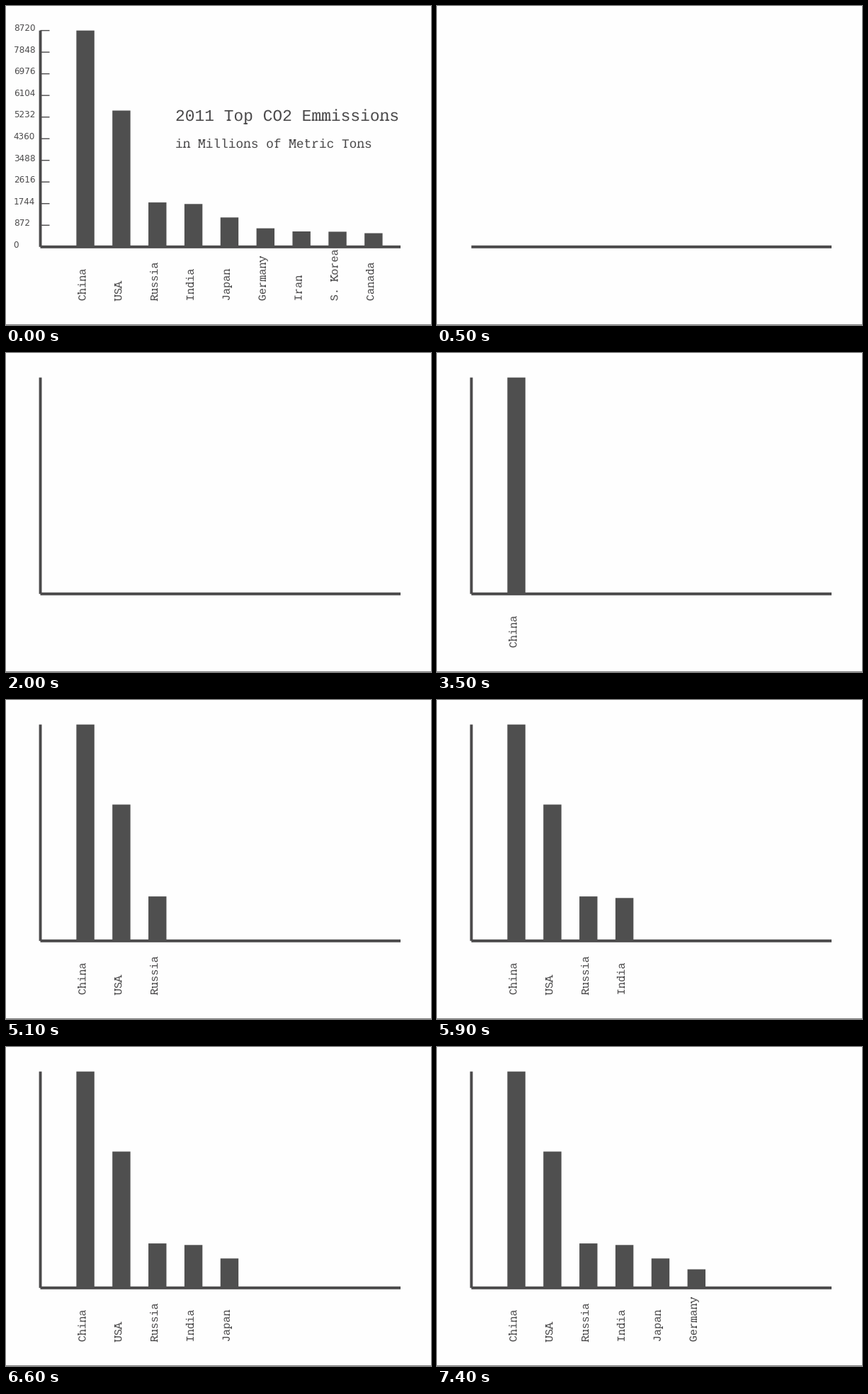
Write a matplotlib script that moves like this. It is 600 px wide and 450 px high and loops after 8000 ms.

```python
import numpy as np
import matplotlib.pyplot as plt
from matplotlib.animation import FuncAnimation
from matplotlib.patches import PathPatch, Rectangle
from matplotlib.path import Path
from matplotlib.textpath import TextPath
from matplotlib.transforms import Affine2D

W, H, DPI = 600, 450, 100
STEP, LOOP = 100, 8000
BG, INK, BAR = "#fefefe", "#4b4a4b", "#4f4f4f"
LEFT, RIGHT, TOP, BASE = 48.5, 557, 34.6, 339.8
PITCH = (RIGHT - LEFT) / 10

BARS = [  # name, bar top, time of appearance in ms (None: only in the full chart)
    ("China", 34.6, 3500), ("USA", 147.5, 4300), ("Russia", 277.1, 5100),
    ("India", 279.3, 5900), ("Japan", 298.3, 6600), ("Germany", 313.6, 7400),
    ("Iran", 318, None), ("S. Korea", 318.4, None), ("Canada", 320.5, None),
]

fig = plt.figure(figsize=(W / DPI, H / DPI), dpi=DPI, facecolor=BG)
ax = fig.add_axes([0, 0, 1, 1])
ax.set(xlim=(0, W), ylim=(H, 0))
ax.axis("off")


def box(x0, y0, x1, y1, color=INK):
    return ax.add_patch(Rectangle((x0, y0), x1 - x0, y1 - y0, lw=0,
                                  fc=color, snap=False))


def slab_glyph(ch):
    """Monospaced glyph, one em tall, with slab serifs on its plain stems."""
    glyph = TextPath((0, 0), ch, size=100, prop={"family": "Liberation Mono"})
    v, codes = glyph.vertices / 100, glyph.codes
    parts = [Path(v, codes)]
    if not ch.isalpha() or ch in "ilI":
        return parts
    ink = v[codes != Path.CLOSEPOLY]
    low, high = ink[:, 1].min(), ink[:, 1].max()
    reach = 0.045 if ch in "mM" else 0.08
    for a, b, code in zip(v[:-1], v[1:], codes[1:]):
        x0, x1 = sorted((a[0], b[0]))
        y = a[1]
        if code != Path.LINETO or abs(y - b[1]) > 0.003 or not 0.05 < x1 - x0 < 0.16:
            continue
        foot = abs(y) < 0.005 or abs(y - low) < 0.005
        if not foot and abs(y - high) > 0.005:
            continue
        x0 -= reach
        if foot or ch.isupper():
            x1 += reach
        y0, y1 = (y, y + 0.07) if foot else (y - 0.07, y)
        parts.append(Path([(x0, y0), (x0, y1), (x1, y1), (x1, y0), (x0, y0)],
                          closed=True))
    return parts


def typed(text, x, y, size, angle=0):
    parts = []
    for i, ch in enumerate(text):
        if ch != " ":
            shift = Affine2D().translate(0.6 * i, 0)
            parts += [p.transformed(shift) for p in slab_glyph(ch)]
    place = Affine2D().scale(size, -size).rotate_deg(angle).translate(x, y)
    word = Path.make_compound_path(*parts).transformed(place)
    return ax.add_patch(PathPatch(word, fc=INK, lw=0, snap=False))


# Always on: horizontal axis and the hairline at the bottom edge
box(LEFT, BASE - 2, RIGHT, BASE + 2)
box(0, 449, W, 450, "#7c7c7c")

timed = [(2000, [box(46.6, TOP, 50.5, BASE)])]

for i, (name, top, start) in enumerate(BARS):
    x = LEFT + PITCH * (i + 1)
    timed.append((start, [box(x, top, x + PITCH / 2, BASE, BAR),
                          typed(name, x + 13, 416.2, 15.2, -90)]))

scale = []
for k, y in enumerate(np.linspace(BASE, TOP, 11)):
    scale.append(ax.text(10.7, y + 0.8, str(872 * k), color=INK,
                         family="DejaVu Sans", size=12 * 72 / DPI, va="baseline"))
    if k:
        scale.append(box(LEFT, y - 0.7, 61.5, y + 0.7))
timed.append((None, scale))
timed.append((None, [typed("2011 Top CO2 Emmissions", 239, 162, 22.9),
                     typed("in Millions of Metric Tons", 239, 200, 17.8)]))


def update(n):
    t = n * STEP
    for start, parts in timed:
        on = t < 500 or (start is not None and t >= start)
        for part in parts:
            part.set_visible(on)
    return []


anim = FuncAnimation(fig, update, frames=LOOP // STEP, interval=STEP,
                     repeat=True, repeat_delay=0, blit=False)
plt.show()
```
